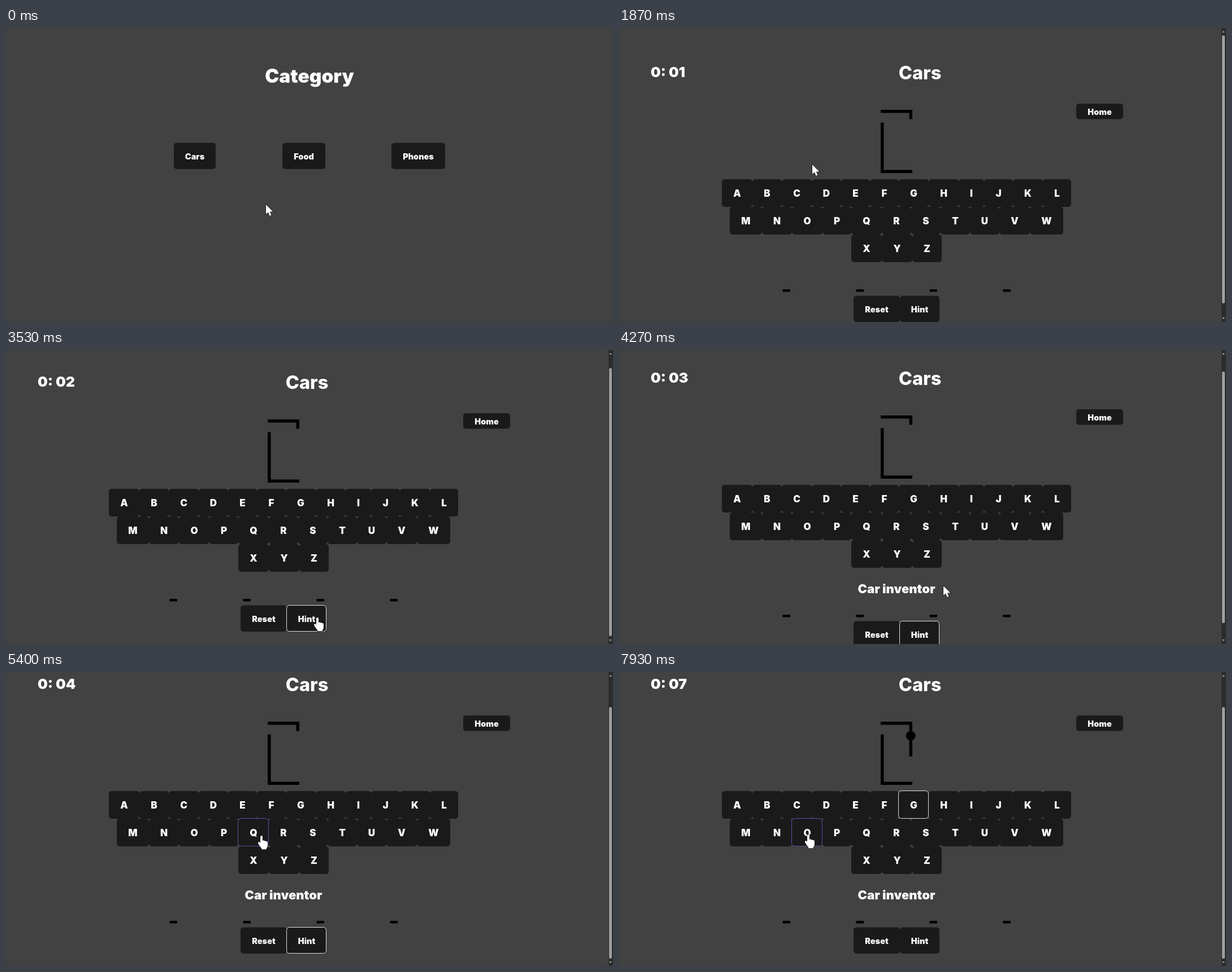
An HTML page with a canvas that plays this animation: 1074 by 521 pixels, repeating every 8 s.

```html
<!DOCTYPE html>
<html>
<head>
<meta charset="utf-8">
<style>
  html, body { margin: 0; width: 100%; height: 100%; overflow: hidden; background: #424242; }
  canvas { display: block; }
</style>
</head>
<body>
<canvas id="stage" width="1074" height="521"></canvas>
<script>
const ctx = document.getElementById('stage').getContext('2d');
const LOOP = 8000, STEP = 200 / 3;
const GAME_START = 800, HINT_SHOWN = 3590, HINT_SHIFT = 35;
const CENTER = 491, PADDING = 40.4, BAR = 5.5;

// Pointer moves: start time, end time, destination x, y
const pointerStart = [460, 313];
const moves = [
  [0, 550, 337, 233], [1560, 1870, 342, 242], [2230, 2940, 546, 484],
  [3050, 3450, 551, 474], [3540, 3590, 553, 463], [3820, 4130, 574, 418],
  [4410, 4870, 452, 290], [6010, 6150, 488, 352], [6150, 6400, 520, 248],
  [7550, 7740, 335, 288]
];
const arrow = new Path2D('M0 0V17L4 13.5 6.5 20 9.5 18.8 7 12.5H12.5Z');
const hand = new Path2D('M-2 2q0-2 2-2t2 2v7q2-1.5 3.5.5 2-1 3 .7 2.5-.7 2.5 2v5q0 3-2 5v2h-9v-2q-3-3-5-7-2-3 0-4t3 2z');

function setFont(size, weight = 900) {
  ctx.font = `${weight} ${size}px Inter, sans-serif`;
}

// A centred row of buttons, each as wide as its label plus padding
function buttonRow(labels, center, y, h, size = 14.5, gap = 0) {
  setFont(size);
  const widths = labels.map(label => ctx.measureText(label).width + PADDING);
  const total = widths.reduce((sum, w) => sum + w + gap, -gap);
  let left = center - total / 2;
  return labels.map((label, i) => {
    const x = Math.round(left), w = Math.round(left + widths[i]) - x;
    left += widths[i] + gap;
    return { label, x, y, w, h, size };
  });
}

const categories = buttonRow(['Cars', 'Food', 'Phones'], 537, 203.5, 46.5, 14.5, 117.5);
const keys = ['ABCDEFGHIJKL', 'MNOPQRSTUVW', 'XYZ']
  .flatMap((letters, i) => buttonRow([...letters], CENTER, 268 + 49 * i, 49, 17));
const home = buttonRow(['Home'], 850.7, 134, 27.5);
const actions = buttonRow(['Reset', 'Hint'], CENTER, 474.5, 46.5);

function ease(t, from, to) {
  const u = Math.min(1, Math.max(0, (t - from) / (to - from)));
  return u * u * (3 - 2 * u);
}

function pointerAt(t) {
  return moves.reduce(([px, py], [from, to, x, y]) => {
    const k = ease(t, from, to);
    return [px + (x - px) * k, py + (y - py) * k];
  }, pointerStart);
}

const scrollAt = t => Math.round(22.3 * ease(t, 3030, 3250) + 34.9 * ease(t, 4200, 4430));
const hintShift = t => t < HINT_SHOWN ? 0 : HINT_SHIFT;

function buttonsAt(t) {
  if (t < GAME_START) return categories;
  const shifted = (buttons, dy) => buttons.map(b => ({ ...b, y: b.y + dy }));
  const dy = -scrollAt(t);
  return [...shifted([...keys, ...home], dy), ...shifted(actions, dy + hintShift(t))];
}

function hoveredAt(t) {
  const [x, y] = pointerAt(t);
  const hit = buttonsAt(t).find(b => x >= b.x && x < b.x + b.w && y >= b.y && y < b.y + b.h);
  return hit && hit.label;
}

function focusedAt(t) {
  if (t < 3450) return '';
  return t < 5450 ? 'Hint' : t < 6650 ? 'Q' : 'G';
}

function text(str, x, middle, size, weight = 900, align = 'center') {
  setFont(size, weight);
  ctx.textAlign = align;
  ctx.fillStyle = '#fff';
  ctx.fillText(str, x, middle + size * 0.364);
}

function rounded(x, y, w, h, r) {
  ctx.beginPath();
  ctx.roundRect(x, y, w, h, r);
}

function outline(b, color, alpha) {
  const snap = v => Math.ceil(v) - 0.5;
  const x = snap(b.x), y = snap(b.y);
  ctx.globalAlpha = alpha;
  ctx.strokeStyle = color;
  ctx.lineWidth = 1;
  rounded(x, y, snap(b.x + b.w) - x, snap(b.y + b.h) - y, 5);
  ctx.stroke();
  ctx.globalAlpha = 1;
}

function drawButtons(t) {
  const buttons = buttonsAt(t), focused = focusedAt(t);
  // Borders fade over 250 ms, so each shows its share of recent hover time
  const recent = Array.from({ length: 10 }, (_, i) => hoveredAt(t - i * 25));
  for (const b of buttons) {
    ctx.fillStyle = '#1a1a1a';
    rounded(b.x, b.y, b.w, b.h, 5);
    ctx.fill();
    text(b.label, b.x + b.w / 2, b.y + b.h / 2 + 0.5, b.size);
  }
  for (const b of buttons) {
    const glow = recent.filter(label => label === b.label).length / 10;
    if (b.label === focused) outline(b, '#fff', 0.85);
    else if (glow) outline(b, '#5054a8', glow);
  }
}

function drawGallows(t, dy) {
  const left = 463, right = 519, top = 145 + dy, bottom = 257 + dy;
  const rope = right - BAR;
  ctx.fillStyle = '#000';
  ctx.fillRect(left, top, right - left, BAR);
  ctx.fillRect(rope, top, BAR, 16.5);
  ctx.fillRect(left, top + 22.5, BAR, bottom - top - 22.5);
  ctx.fillRect(left, bottom - BAR, right - left, BAR);
  if (t > 5510) {
    ctx.beginPath();
    ctx.arc(rope + BAR / 2, top + 25, 8.5, 0, 7);
    ctx.fill();
  }
  if (t > 6710) ctx.fillRect(rope, top + 25, BAR, 36.5);
}

function drawScrollbar(t, scroll) {
  const view = 475, length = t < HINT_SHOWN ? view : 446;
  ctx.fillStyle = '#2c2c2c';
  ctx.fillRect(1066, 0, 8, 521);
  ctx.fillStyle = '#9f9f9f';
  rounded(1067, 13 + scroll * 0.86, 5, length, 2.5);
  ctx.fill();
  for (const [base, tip] of [[8, 5], [513, 516]]) {
    ctx.beginPath();
    ctx.moveTo(1067, base);
    ctx.lineTo(1072, base);
    ctx.lineTo(1069.5, tip);
    ctx.fill();
  }
}

function drawGame(t) {
  const scroll = scrollAt(t);
  const seconds = Math.max(0, Math.floor((t - 765) / 1015));
  text(`0: 0${seconds}`, 56, 78 - scroll, 25, 900, 'left');
  text('Cars', 532.5, 79.5 - scroll, 32.5, 800);
  drawGallows(t, -scroll);
  drawButtons(t);
  if (t >= HINT_SHOWN) text('Car inventor', CENTER, 451.5 - scroll, 22);
  ctx.fillStyle = '#000';
  for (let i = 0; i < 4; i++) {
    ctx.fillRect(289.5 + 130 * i, 463 - scroll + hintShift(t), 13.5, 4.5);
  }
  drawScrollbar(t, scroll);
}

function drawPointer(t) {
  const shape = hoveredAt(t) ? hand : arrow;
  ctx.save();
  ctx.translate(...pointerAt(t));
  ctx.strokeStyle = '#111';
  ctx.lineWidth = 1.5;
  ctx.stroke(shape);
  ctx.fillStyle = '#fff';
  ctx.fill(shape);
  ctx.restore();
}

function draw(now) {
  // The screen updates 15 times per second
  const t = Math.floor((now % LOOP + 4) / STEP) * STEP % LOOP;
  ctx.fillStyle = '#303030';
  ctx.fillRect(0, 0, 1074, 521);
  ctx.fillStyle = '#424242';
  rounded(0, 0, 1074, 521, 4);
  ctx.fill();
  if (t < GAME_START) {
    text('Category', 537, 85, 33.5);
    drawButtons(t);
  } else {
    drawGame(t);
  }
  drawPointer(t);
}

const start = performance.now();
function tick() {
  draw(performance.now() - start);
  requestAnimationFrame(tick);
}
tick();
</script>
</body>
</html>
```
